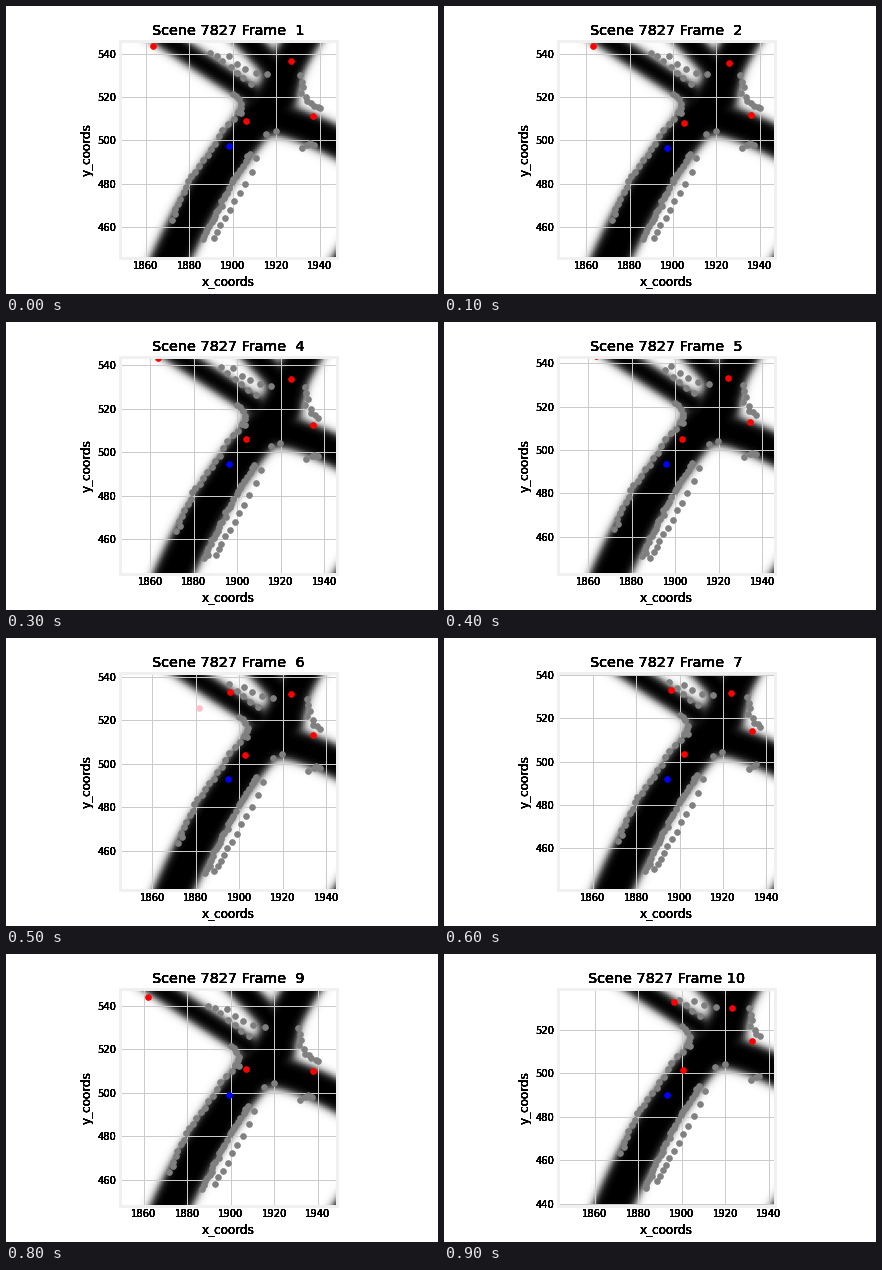
Animation of 432 by 288 pixels, one loop 1 s. Source, as a matplotlib script:

```python
import numpy as np
import matplotlib.pyplot as plt
from matplotlib.animation import FuncAnimation
from matplotlib.ticker import MultipleLocator

W, H, DPI = 432, 288, 72
SIDE = 217.15
LEFT, BOTTOM = 222.48 - SIDE / 2, 253.44 - SIDE
X0, X1, Y0, Y1 = 1836, 1962, 428, 556

plt.rcParams.update({"font.family": "DejaVu Sans", "font.size": 10})

# Road centre lines as quadratic curves (start, control, end) with half widths
ROADS = [
    ((1861, 420), (1881.5, 478), (1920, 520), 8.8),
    ((1918, 514), (1921, 532), (1938, 556), 8),
    ((1910, 511), (1930, 510.5), (1962, 491), 7.2),
    ((1852, 558), (1877, 541), (1908, 521), 4.7),
    ((1896, 556), (1908, 545), (1924, 527), 5.5),
    ((1941, 430), (1948, 442), (1962, 462), 5),
]

# Curves that grey markers follow, with their number
TRAILS = [
    ((1872, 463.5), (1880, 486), (1902.5, 513), 20),
    ((1883.1, 447), (1892, 468), (1907.7, 494), 30),
    ((1888.5, 450.5), (1895.5, 461), (1910.8, 491), 12),
    ((1903, 512.5), (1904.5, 518), (1899.8, 522), 6),
    ((1890, 541), (1898, 534), (1908.5, 526), 7),
    ((1898, 539), (1905, 531), (1915.5, 530.7), 5),
    ((1931.3, 530), (1931.5, 516), (1940.5, 514.5), 10),
    ((1915.3, 502.8), (1917, 504), (1919.5, 504.3), 2),
    ((1932.8, 496.2), (1934, 500), (1937.8, 498), 4),
]


def curve(start, control, end, count):
    u = np.linspace(0, 1, count)[:, None]
    a, b, c = map(np.array, (start, control, end))
    return (1 - u) ** 2 * a + 2 * u * (1 - u) * b + u ** 2 * c


def road_image(rounding=1.5, softness=1.05):
    gx, gy = np.meshgrid(np.arange(X0, X1) + 0.5, np.arange(Y0, Y1) + 0.5)
    joined = np.zeros(gx.shape)
    for *points, half_width in ROADS:
        distance = np.full(gx.shape, np.inf)
        for x, y in curve(*points, 90):
            distance = np.minimum(distance, np.hypot(gx - x, gy - y))
        joined += np.exp((half_width - distance) / rounding)
    edge = -rounding * np.log(joined + 1e-12)
    return 1 / (1 + np.exp(edge / softness))


def make_markers():
    rng = np.random.default_rng(4)
    points = np.vstack([curve(*trail) for trail in TRAILS])
    return points + rng.normal(0, 0.35, points.shape)


MARKERS = make_markers()


def ego(t):
    return 1899.3 - 0.615 * t, 499.2 - 0.86 * t - 0.008 * t * t


def cars(t):
    parked = np.exp(-t)
    found = [(1907.1 - 0.63 * t, 510.9 - 0.95 * t),
             (1938 - 0.66 * t + 0.012 * t * t, 510.1 + 0.47 * t),
             (1863.4 - 1.5 * parked, 543.4 + 0.9 * parked)]
    if t > 0:
        found.append((1928 - 0.74 * t + 0.024 * t * t,
                      538.6 - 1.03 * t + 0.016 * t * t))
    if t >= 7:
        found.append((1895.9 + 0.2 * (t - 7), 533.2 - 0.13 * (t - 7)))
    return found


def visible_markers(t):
    x, y = ego(t)
    dx, dy = (MARKERS - (x, y)).T
    return MARKERS[(dx < 42.8) & (dy > -43.5) & (dy < 45)]


fig = plt.figure(figsize=(W / DPI, H / DPI), dpi=DPI, facecolor="white")
# Stacked copies of the axes give the heavy lettering
box = (LEFT / W, BOTTOM / H, SIDE / W, SIDE / H)
layers = [fig.add_axes(box, label=f"layer{k}") for k in range(7)]
for ax in layers:
    ax.patch.set_visible(ax is layers[0])
    ax.tick_params(length=0, pad=3.5, labelsize=10)
    ax.xaxis.set_major_locator(MultipleLocator(20))
    ax.yaxis.set_major_locator(MultipleLocator(20))
    ax.set_xlabel("x_coords", fontsize=12)
    ax.set_ylabel("y_coords", fontsize=12)
    for spine in ax.spines.values():
        spine.set(color="#f0f0f0", linewidth=3)

base = layers[0]
base.set_axisbelow(True)
base.grid(color="#cbcbcb", linewidth=1)
base.imshow(road_image(), cmap="gray_r", vmin=0, vmax=1, origin="lower",
            extent=(X0, X1, Y0, Y1), aspect="auto")


def dots(color):
    return base.plot([], [], "o", color=color, ms=5.6, mew=1)[0]


grey, pink, red, blue = map(dots, ("gray", "pink", "red", "blue"))
pink.set_data([1881.4], [525.9])


def draw(i):
    number = i + 1
    # The ninth picture is the earliest moment of the drive
    t = {9: 0, 10: 10}.get(number, number + 1)
    x, y = ego(t)
    cx, cy = round(x), round(y) - 1
    for ax in layers:
        ax.set_xlim(cx - 50, cx + 50)
        ax.set_ylim(cy - 50, cy + 50)
        ax.set_title(f"Scene 7827 Frame {number:2d}", fontsize=14.4, pad=6)
    grey.set_data(*visible_markers(t).T)
    red.set_data(*np.transpose(cars(t)))
    blue.set_data([x], [y])
    pink.set_visible(t == 7)
    return grey, pink, red, blue


anim = FuncAnimation(fig, draw, frames=10, interval=100, repeat=True,
                     repeat_delay=0, blit=False)
plt.show()
```
